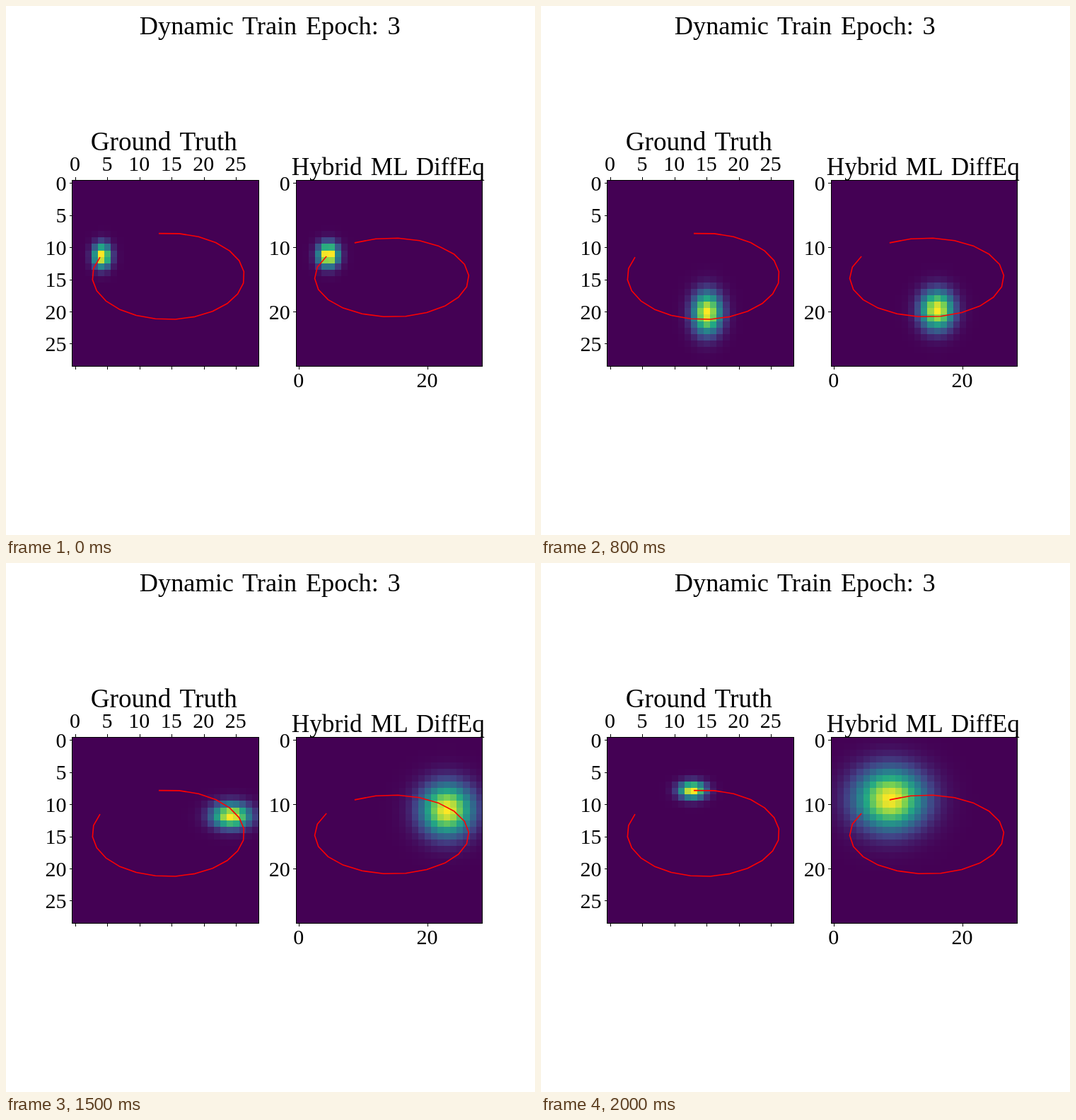
An HTML page with a canvas for the animation above (2100 ms loop, 748 by 748 pixels).

```html
<!DOCTYPE html>
<html lang="en">
<head>
<meta charset="utf-8">
<title>Dynamic Train</title>
<style>
  html, body { margin: 0; width: 100%; height: 100%; overflow: hidden; background: #fff; }
  canvas, svg { position: absolute; left: 0; top: 0; width: 748px; height: 748px; }
  text { font-family: "Liberation Serif", "Times New Roman", serif; fill: #000; word-spacing: 0.1em; }
  .axis { fill: none; stroke: #000; stroke-width: 1; shape-rendering: crispEdges; }
  .trace { fill: none; stroke: #f00; stroke-width: 1.6; stroke-linejoin: round; stroke-linecap: square; }
</style>
</head>
<body>
<canvas id="heat" width="748" height="748"></canvas>
<svg id="plot" viewBox="0 0 748 748"></svg>
<script>
const STEP = 100, STEPS = 21;
const GRID = 29, SIZE = 263.6, CELL = SIZE / GRID;
const TOP = 246.2, HEAT_TOP = 245.6;
const VIRIDIS = ['440154', '414487', '2a788e', '22a884', '7ad151', 'fde725']
  .map(hex => [0, 2, 4].map(i => parseInt(hex.slice(i, i + 2), 16)));

// Each panel: an elliptic orbit in stage pixels, angles in degrees,
// and the blob's widths in cells by orbit angle and progress.
const truth = {
  left: 93.8, cx: 229.5, cy: 382.2, rx: 107.5, ry: 61, start: -25.6, turn: 15.12,
  spread: angle => [1.5 - 0.6 * Math.cos(angle), 1.55 + 0.65 * Math.sin(angle)]
};
const hybrid = {
  left: 410.1, cx: 545.5, cy: 383.8, rx: 109, ry: 55.8, start: -31.6, turn: 16.5,
  spread: (angle, progress) => [1.1 + 2.6 * progress ** 1.5, 1.25 + 2 * progress]
};
const panels = [truth, hybrid];

const svg = document.getElementById('plot');
const ctx = document.getElementById('heat').getContext('2d');

const along = (start, value) => start + (value + 0.5) * CELL;
const angleAt = (panel, step) => (panel.start + panel.turn * step) * Math.PI / 180;

function orbit(panel, step) {
  const angle = angleAt(panel, step);
  return [panel.cx - panel.rx * Math.cos(angle), panel.cy + panel.ry * Math.sin(angle)];
}

function add(tag, attrs, text) {
  const node = document.createElementNS('http://www.w3.org/2000/svg', tag);
  for (const name in attrs) node.setAttribute(name, attrs[name]);
  if (text !== undefined) node.textContent = text;
  svg.appendChild(node);
}

function label(text, x, y, size, anchor = 'middle') {
  add('text', { x, y, 'font-size': size, 'text-anchor': anchor }, text);
}

function tick(x, y, dx, dy) {
  add('path', { class: 'axis', d: `M${x} ${y}l${dx} ${dy}` });
}

function rowTick(left, value) {
  const y = along(TOP, value);
  tick(left, y, -4, 0);
  label(value, left - 8.4, y + 10.3, 30, 'end');
}

function columnTick(left, value, baseline) {
  const x = along(left, value);
  tick(x, TOP + SIZE, 0, 4);
  label(value, x - 0.9, baseline, 30);
}

function drawAxes() {
  for (const panel of panels) {
    const points = Array.from({ length: STEPS }, (_, step) => orbit(panel, step));
    add('polyline', { class: 'trace', points: points.join(' ') });
    add('rect', { class: 'axis', x: panel.left, y: TOP, width: SIZE, height: SIZE });
  }
  for (let v = 0; v <= 25; v += 5) {
    rowTick(truth.left, v);
    columnTick(truth.left, v, 233);
    tick(along(truth.left, v), TOP, 0, -4);
  }
  for (let v = 0; v <= 20; v += 10) rowTick(hybrid.left, v);
  for (let v = 0; v <= 20; v += 20) columnTick(hybrid.left, v, 538.5);

  label('Dynamic Train Epoch: 3', 373.2, 40, 36.3);
  label('Ground Truth', 223.3, 204, 37.2);
  label('Hybrid ML DiffEq', 540.3, 238.5, 35.2);
}

function colour(value) {
  const pos = value * (VIRIDIS.length - 1);
  const i = Math.min(VIRIDIS.length - 2, Math.floor(pos));
  const mix = VIRIDIS[i].map((c, n) => Math.round(c + (VIRIDIS[i + 1][n] - c) * (pos - i)));
  return `rgb(${mix})`;
}

// Gaussian sampled on the cells, scaled so that its largest sample is 1.
function profile(centre, sigma) {
  const samples = Array.from({ length: GRID }, (_, i) => Math.exp(-((i - centre) ** 2) / (2 * sigma * sigma)));
  const peak = Math.max(...samples);
  return samples.map(s => s / peak);
}

function drawBlob(panel, step) {
  const [px, py] = orbit(panel, step);
  const [sx, sy] = panel.spread(angleAt(panel, step), step / (STEPS - 1));
  // The blob's grid is slightly coarser than the orbit's.
  const cols = profile(((px - panel.left) / CELL + 0.2) / 1.08, sx);
  const rows = profile(((py - TOP) / CELL + 0.2) / 1.08, sy);
  const edge = (start, i) => Math.round(start + i * CELL);
  rows.forEach((v, r) => cols.forEach((u, c) => {
    const x = edge(panel.left, c), y = edge(HEAT_TOP, r);
    ctx.fillStyle = colour(u * v);
    ctx.fillRect(x, y, edge(panel.left, c + 1) - x, edge(HEAT_TOP, r + 1) - y);
  }));
}

let shown = -1;
const begin = performance.now();

function render(now) {
  const step = Math.floor(Math.max(0, now - begin) / STEP) % STEPS;
  if (step !== shown) {
    shown = step;
    panels.forEach(panel => drawBlob(panel, step));
  }
  requestAnimationFrame(render);
}

drawAxes();
render(begin);
</script>
</body>
</html>
```
